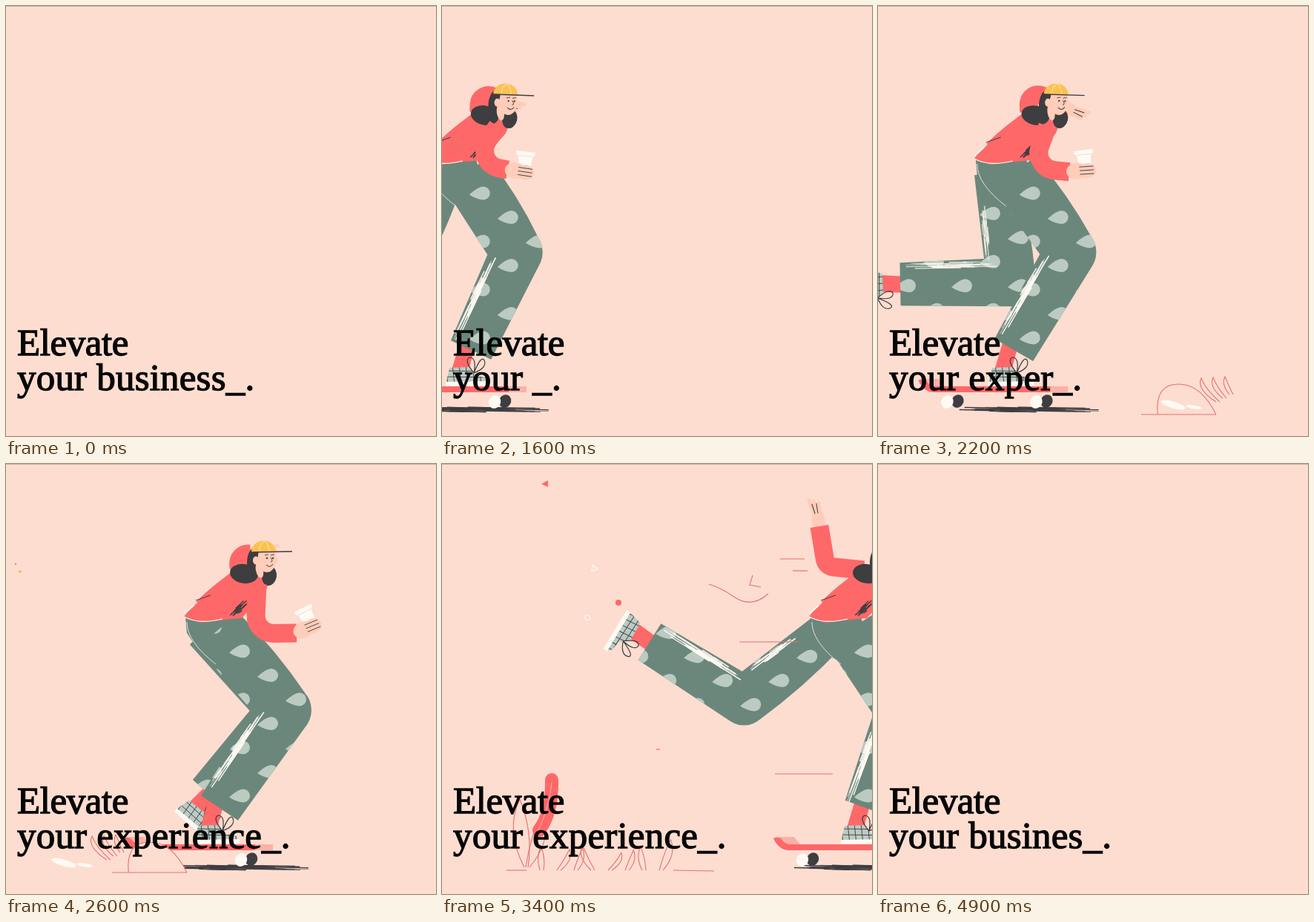
These frames come from a looping animation (580 px wide and 580 px high, 5000 ms). An HTML page with a canvas:

```html
<!DOCTYPE html>
<html lang="en">
<head>
<meta charset="utf-8">
<title>Elevate</title>
<style>
html, body { margin: 0; width: 100%; height: 100%; overflow: hidden; background: #fdddd0; }
canvas { position: absolute; left: 0; top: 0; }
h1 {
  position: absolute; left: 15px; top: 431px; margin: 0; white-space: nowrap;
  font: 400 51px/47px "Liberation Serif", "Times New Roman", serif;
  color: #060606; -webkit-text-stroke: 1.3px #060606;
}
h1 span { display: block; letter-spacing: -.4px; }
h1 span + span { letter-spacing: .2px; }
</style>
</head>
<body>
<canvas id="stage" width="580" height="580"></canvas>
<h1><span>Elevate</span><span id="typed">your business_.</span></h1>
<script>
const c = document.getElementById('stage').getContext('2d');
const typed = document.getElementById('typed');
const LOOP = 5000, STEP = 100;
const BG = '#fdddd0', RED = '#ff6868', PINK = '#fbb0a8', GREEN = '#6b877b', PALE = '#bccbc2',
      DARK = '#3e3d40', SKIN = '#ffcdb9', WHITE = '#fffaf3', LINE = '#e3726f', YELLOW = '#fbc253';

// Positions are relative to the back of the waist.
// back: thigh, shin and foot angle; front: x of hip, knee and hem; arms: elbow, wrist;
// hold: turn of the cup; head: x, turn; board: its left end.
const push = {
  back: [104.5, 210, 0], front: [58, 125, 57], rear: [146 - 47, 102, 137, 143],
  fore: [66, 212, 113, 221], hold: [.1], head: [96, .08], board: [-71]
};
const crouch = {
  back: [46, 131, 0], front: [46, 137, 48], rear: [32, 125, 90, 121],
  fore: [96, 229, 152, 228], hold: [-.45], head: [91, 0], board: [-82]
};
const glide = {
  back: [140.5, 212, 0], front: [54, 125, 77], rear: [23, 138, 14, 84],
  fore: crouch.fore, hold: crouch.hold, head: [88, 0], board: [-48]
};
const KEYS = [
  { t: 1100, x: -143, pose: { ...glide, fore: push.fore, hold: push.hold } },
  { t: 1900, x: 47, pose: push },
  { t: 2600, x: 240, pose: crouch },
  { t: 3400, x: 495, pose: glide },
  { t: 4200, x: 728, pose: { ...glide, back: [138, 210, 21] } },
  { t: 4700, x: 874, pose: { ...glide, back: [138, 210, 21] } }
];

const lerp = (a, b, k) => a + (b - a) * k;
const clamp = v => Math.max(0, Math.min(1, v));
const ease = k => k * k * (3 - 2 * k);
const rad = d => d * Math.PI / 180;
const noise = n => { const s = Math.sin(n * 12.9898) * 43758.5453; return s - Math.floor(s); };
const reach = ([x, y], deg, len) => [x + Math.cos(rad(deg)) * len, y + Math.sin(rad(deg)) * len];
const dist = (a, b) => Math.hypot(b[0] - a[0], b[1] - a[1]);

// Point u along the bone a-b, v to its side.
function beside(a, b, u, v) {
  const l = dist(a, b), dx = (b[0] - a[0]) / l, dy = (b[1] - a[1]) / l;
  return [a[0] + dx * u - dy * v, a[1] + dy * u + dx * v];
}

function sample(t) {
  const i = Math.max(0, KEYS.findLastIndex((key, n) => n < KEYS.length - 1 && t >= key.t));
  const a = KEYS[i], b = KEYS[i + 1], k = clamp((t - a.t) / (b.t - a.t)), pose = {};
  for (const part in a.pose)
    pose[part] = a.pose[part].map((v, j) => lerp(v, b.pose[part][j], ease(k)));
  return { x: lerp(a.x, b.x, k), pose };
}

function trace(p) {
  c.beginPath();
  for (let i = 0; i < p.length; i += 2) c.lineTo(p[i], p[i + 1]);
}

function stroke(color, width) {
  c.strokeStyle = color;
  c.lineWidth = width;
  c.stroke();
}

function fill(color) {
  c.fillStyle = color;
  c.fill();
}

function line(color, width, ...p) {
  trace(p);
  stroke(color, width);
}

function poly(color, ...p) {
  trace(p);
  fill(color);
}

function curve(color, width, x, y, ...q) {
  c.beginPath();
  c.moveTo(x, y);
  for (let i = 0; i < q.length; i += 4) c.quadraticCurveTo(q[i], q[i + 1], q[i + 2], q[i + 3]);
  stroke(color, width);
}

function oval(color, x, y, rx, ry = rx, turn = 0) {
  c.beginPath();
  c.ellipse(x, y, rx, ry, turn, 0, 7);
  fill(color);
}

function local(x, y, turn, draw) {
  c.save();
  c.translate(x, y);
  c.rotate(turn);
  draw();
  c.restore();
}

// Dry brush: a bundle of thin seeded strokes from a to b.
function brush(a, b, width, color, count) {
  const len = dist(a, b);
  for (let i = 1; i <= count; i++) {
    const from = noise(i) * .65, to = Math.min(1, from + .15 + noise(i + 40) * .4);
    const v = (noise(i + 80) - .5) * width;
    line(color, .6 + noise(i + 120), ...beside(a, b, from * len, v), ...beside(a, b, to * len, v + 1));
  }
}

function drop(x, y) {
  c.beginPath();
  c.moveTo(x - 15, y + 2);
  c.quadraticCurveTo(x - 3, y - 9, x + 4, y - 9);
  c.arc(x + 4, y, 9, -Math.PI / 2, Math.PI / 2);
  c.quadraticCurveTo(x - 6, y + 8, x - 15, y + 2);
  fill(PALE);
}

function segment(a, b, wa, wb, bulge) {
  const l = dist(a, b);
  c.moveTo(...beside(a, b, 0, wa));
  c.lineTo(...beside(a, b, l, wb));
  c.lineTo(...beside(a, b, l, -wb));
  c.quadraticCurveTo(...beside(a, b, l / 2, -(wa + wb) / 2 - bulge), ...beside(a, b, 0, -wa));
  c.closePath();
}

// Trouser leg with a diamond lattice of drops starting at (x, y).
function drawLeg({ hip, knee, hem }, [w0, w1, w2], [x, y], thighBrush, shinBrush) {
  c.save();
  c.beginPath();
  segment(hip, knee, w0, w1, 7);
  segment(knee, hem, w1, w2, 0);
  c.moveTo(knee[0] + w1, knee[1]);
  c.arc(knee[0], knee[1], w1, 0, Math.PI * 2, true);
  fill(GREEN);
  c.clip();
  for (let row = -6; row <= 8; row++)
    for (let col = -3; col <= 3; col++)
      drop(x + col * 76 + (row & 1) * 38, y + row * 32.5);
  c.globalAlpha = shinBrush;
  brush(beside(knee, hem, 14, w2 - 4), beside(knee, hem, 142, w2 - 6), 8, WHITE, 26);
  c.globalAlpha = thighBrush;
  brush(beside(hip, knee, 40, w0 - 4), beside(hip, knee, 116, w0 - 3), 8, WHITE, 20);
  c.restore();
}

function drawFoot(lean) {
  poly(RED, lean - 10, -10, lean + 12, -10, 10, 30, -13, 30);
  c.save();
  trace([-20, 46, -15, 24, 11, 23, 22, 35, 37, 38, 41, 46]);
  fill(PALE);
  c.clip();
  for (let i = -20; i < 44; i += 9) line(DARK, .9, i, 20, i + 3, 48);
  for (let y = 28; y < 46; y += 8) line(DARK, .9, -22, y, 44, y + 1);
  c.restore();
  line(WHITE, 6, -20, 46, 41, 45);
  curve(DARK, 1.2, 18, 31, 4, 14, 12, 10, 22, 10, 18, 31, 28, 6, 32, 14, 36, 24, 18, 31);
}

function drawBoard(x) {
  c.beginPath();
  c.moveTo(x, 505);
  c.quadraticCurveTo(x + 8, 501, x + 13, 508);
  c.quadraticCurveTo(x + 17, 513, x + 26, 513);
  c.lineTo(x + 180, 513);
  c.lineTo(x + 180, 521);
  c.lineTo(x + 20, 521);
  c.quadraticCurveTo(x + 7, 520, x, 505);
  fill(RED);
  poly(PINK, x + 8, 503, x + 28, 503, x + 36, 513, x + 20, 513);
  c.fillStyle = PINK;
  c.fillRect(x + 178, 513, 24, 8);
  for (const w of [x + 46, x + 166]) {
    oval(DARK, w + 7, 533, 8, 9, .5);
    oval(WHITE, w - 7, 534, 8, 9, .5);
  }
}

function sleeve(x, y, [ex, ey, wx, wy], round) {
  c.beginPath();
  c.moveTo(x, y);
  c.arcTo(ex, ey, wx, wy, round);
  c.lineTo(wx, wy);
  stroke(RED, 25);
}

function drawRearHand([ex, ey, wx, wy]) {
  local(wx, wy, Math.atan2(wy - ey, wx - ex), () => {
    oval(SKIN, 8, 0, 15, 9);
    c.lineCap = 'round';
    for (let i = -1; i <= 1; i++) line(SKIN, 5, 14, i * 4, 34 - i * 3, i * 6 - 2);
    for (let i = 0; i < 2; i++) line(DARK, 1, 18, i * 4 - 3, 31, i * 6 - 5);
  });
}

function drawHead([x, turn]) {
  local(x, 118, turn, () => {
    oval(DARK, 3, 16, 9, 20);
    oval(DARK, -10, 30, 19, 13, .15);
    oval(DARK, 24, 33, 10, 13, .2);
    oval(SKIN, 11, 25, 5, 11, -.2);
    oval(SKIN, 21, 10, 12.5, 18);
    oval(SKIN, 33, 12, 3, 4);
    oval(SKIN, 6, 12, 4, 5.5);
    for (const eye of [21, 29]) {
      oval(DARK, eye, 9, 1.2);
      line(DARK, .9, eye - 3, 5, eye + 2, 4);
    }
    curve(DARK, .9, 26, 8, 30, 14, 26, 14);
    curve(DARK, 1, 20, 18, 25, 23, 29, 17);
    c.beginPath();
    c.moveTo(0, 1);
    c.bezierCurveTo(0, -19, 32, -20, 33, 1);
    fill(YELLOW);
    for (const seam of [11, 24]) curve('#fde4a8', 1, seam, 0, seam - 1, -10, 18, -14);
    line(DARK, 1.3, 0, 1, 55, 0);
  });
}

function drawCup([, , wx, wy], [turn]) {
  local(wx, wy, turn, () => {
    poly(WHITE, 12, -22, 32, -22, 29, 4, 16, 4);
    poly(WHITE, 9, -27, 35, -27, 34, -21, 10, -21);
    line('#e5dcd5', .8, 11, -21, 33, -21);
    oval(SKIN, 10, 0, 14, 11);
    oval(SKIN, 24, 1, 12, 10);
    for (let y = -5; y < 8; y += 5) line(DARK, .9, 14, y, 33, y + 1);
  });
}

function drawRider(t) {
  const { x, pose } = sample(t);
  const [thigh, shin, foot] = pose.back, [hipX, kneeX, hemX] = pose.front;
  const back = { hip: [28, 224] };
  back.knee = reach(back.hip, thigh, 150);
  back.hem = reach(back.knee, shin, 150);
  const front = { hip: [hipX, 224], knee: [kneeX, 332], hem: [hemX, 464] };
  const kicked = clamp((thigh - 60) / 30);

  c.save();
  c.translate(x, 0);
  brush([-20, 544], [168, 544], 6, DARK, 34);
  drawBoard(pose.board[0]);
  drawRearHand(pose.rear);
  sleeve(74, 143, pose.rear, 13);
  local(...back.hem, rad(shin - 90 + foot), () => drawFoot(0));
  drawLeg(back, [28, 33, 29], [back.knee[0] + 10, back.knee[1] + 5], kicked, kicked);
  local(hemX - 14, 464, 0, () => drawFoot(9));
  poly(GREEN, 2, 206, 70, 206, 78, 235, 50, 270, 24, 258, 4, 228);
  drawLeg(front, [36, 35, 30], [38, 220], 0, 1);
  curve('#dfe2d8', 1, 4, 213, 4, 240, 43, 270);

  c.beginPath();
  c.moveTo(0, 206);
  c.quadraticCurveTo(18, 180, 56, 152);
  c.quadraticCurveTo(82, 130, 102, 140);
  c.quadraticCurveTo(120, 152, 110, 172);
  c.lineTo(78, 208);
  c.quadraticCurveTo(40, 211, 22, 214);
  c.closePath();
  fill(RED);
  curve(WHITE, 1.2, 0, 206, 20, 217, 52, 209);
  brush([1, 203], [17, 186], 3, WHITE, 7);
  line(DARK, 1, 16, 184, 36, 177);
  brush([64, 207], [84, 184], 8, DARK, 24);
  drawHead(pose.head);
  sleeve(99, 162, pose.fore, 24);
  drawCup(pose.fore, pose.hold);
  c.restore();
}

function hill(x, y, w, h) {
  c.beginPath();
  c.moveTo(x + w * .22, y);
  c.quadraticCurveTo(x + w * .18, y - h, x + w * .5, y - h);
  c.quadraticCurveTo(x + w * .8, y - h, x + w, y);
  fill(BG);
  stroke(LINE, 1.1);
  line(LINE, 1.1, x, y, x + w, y);
}

function leaf(x, y, h, lean) {
  curve(LINE, 1.1, x, y, x + lean - h * .22, y - h * .55, x + lean, y - h,
    x + lean + h * .2, y - h * .5, x + 5, y);
}

function puddle(x, y) {
  oval(WHITE, x + 16, y, 17, 4.5, .28);
  oval(WHITE, x + 44, y + 3, 11, 2.4, .15);
}

function drawPlant(x) {
  line(LINE, 1.1, x, 548, x + 27, 548);
  line(LINE, 1.1, x + 225, 548, x + 280, 549);
  leaf(x + 24, 544, 92, -6);
  leaf(x + 26, 544, 74, 22);
  c.lineCap = 'round';
  curve(RED, 18, x + 61, 426, x + 62, 470, x + 44, 494);
  c.lineCap = 'butt';
  curve(PINK, 1, x + 61, 430, x + 58, 470, x + 34, 510);
  for (let i = 0; i < 8; i++) leaf(x + 45 + i * 23, 548, 20 + noise(i + 3) * 22, noise(i + 9) * 36 - 18);
}

function drawScenery(t) {
  const far = at => (at - t) * .53, near = at => (at - t) * .8;
  hill(143 + far(2600), 551, 101, 41);
  hill(193 + far(4200), 544, 56, 24);
  puddle(62 + near(2600), 538);
  puddle(555 + near(4200), 539);
  oval(WHITE, 532 + near(4200), 542, 5, 1.6, .2);
  for (let i = 0; i < 3; i++) leaf(136 + i * 9 + near(2600), 534 - i * 5, 32 - i * 4, i * 7 - 20);
  drawPlant(87 + near(3400));
}

function ring(color, x, y, r, sides, turn) {
  c.beginPath();
  for (let i = 0; i < sides; i++) c.lineTo(...reach([x, y], turn + i * 360 / sides, r));
  c.closePath();
  stroke(color, 1.1);
}

function drawConfetti(t) {
  if (Math.abs(t - 1900) <= 300) ring(LINE, 1 - (t - 1900) * .05, 193, 11, 3, 0);
  if (Math.abs(t - 2600) <= 200) {
    oval('#e58d80', 13, 135, 1.2);
    oval('#f7b45c', 19, 145, 2.2, 1.5);
  }
  if (t < 3000) return;
  const k = (t - 3400) / 800;
  c.globalAlpha = clamp(1 - k * .4) * clamp((4700 - t) / 400);
  ring(WHITE, lerp(205, 234, k), lerp(141, 131, k), 5, 3, lerp(12, -90, k));
  ring(WHITE, lerp(196, 213, k), lerp(207, 230, k), 3.5, 20, 0);
  if (k > .4) ring('#fbe9de', 282, 219, 2.8, 20, 0);
  c.globalAlpha = 1;
  if (k < 1.4) oval(k < .5 ? RED : '#f3cabe', lerp(238, 264, k), lerp(187, 191, k), 4);
  if (k < .8) poly(RED, 134 + k * 12, 27 - k * 16, 143 + k * 12, 22 - k * 16, 143 + k * 12, 31 - k * 16);
}

function drawStreaks(t) {
  const grow = clamp(1 - Math.abs(t - 3400) / 450);
  if (!grow) return;
  const streak = (x, y, len) => line(LINE, 1.2, x, y, x + len * grow, y);
  c.save();
  c.translate((3400 - t) * .3, 0);
  streak(456, 128, 33);
  streak(473, 144, 20);
  streak(401, 240, 81);
  streak(449, 418, 78);
  streak(289, 385, 5);
  if (grow > .5) {
    curve(LINE, 1.1, 360, 162, 378, 168, 392, 178, 417, 196, 440, 175);
    line(LINE, 1.1, 419, 150, 415, 163, 430, 166);
  }
  c.restore();
}

function word(t) {
  const type = (text, from, pace) => text.slice(0, Math.max(0, Math.floor((t - from) / pace)));
  if (t < 400) return 'business'.slice(0, Math.max(0, 8 - 3 * t / STEP));
  if (t < 1500) return type('work', 300, 100);
  if (t < 1600) return 'wo';
  if (t < 4700) return type('experience', 1720, 85);
  return t < 4900 ? 'business' : 'busines';
}

function render(t) {
  c.fillStyle = BG;
  c.fillRect(0, 0, 580, 580);
  if (t >= 1100 && t < 4700) {
    drawRider(t);
    drawStreaks(t);
    drawScenery(t);
    drawConfetti(t);
  }
  c.fillStyle = '#c9b1a7';
  c.fillRect(0, 0, 580, 1);
  typed.textContent = `your ${word(t)}_.`;
}

const start = performance.now();
function tick() {
  const t = (performance.now() - start) % LOOP;
  render(Math.floor(t / STEP) * STEP);
  requestAnimationFrame(tick);
}
tick();
</script>
</body>
</html>
```
